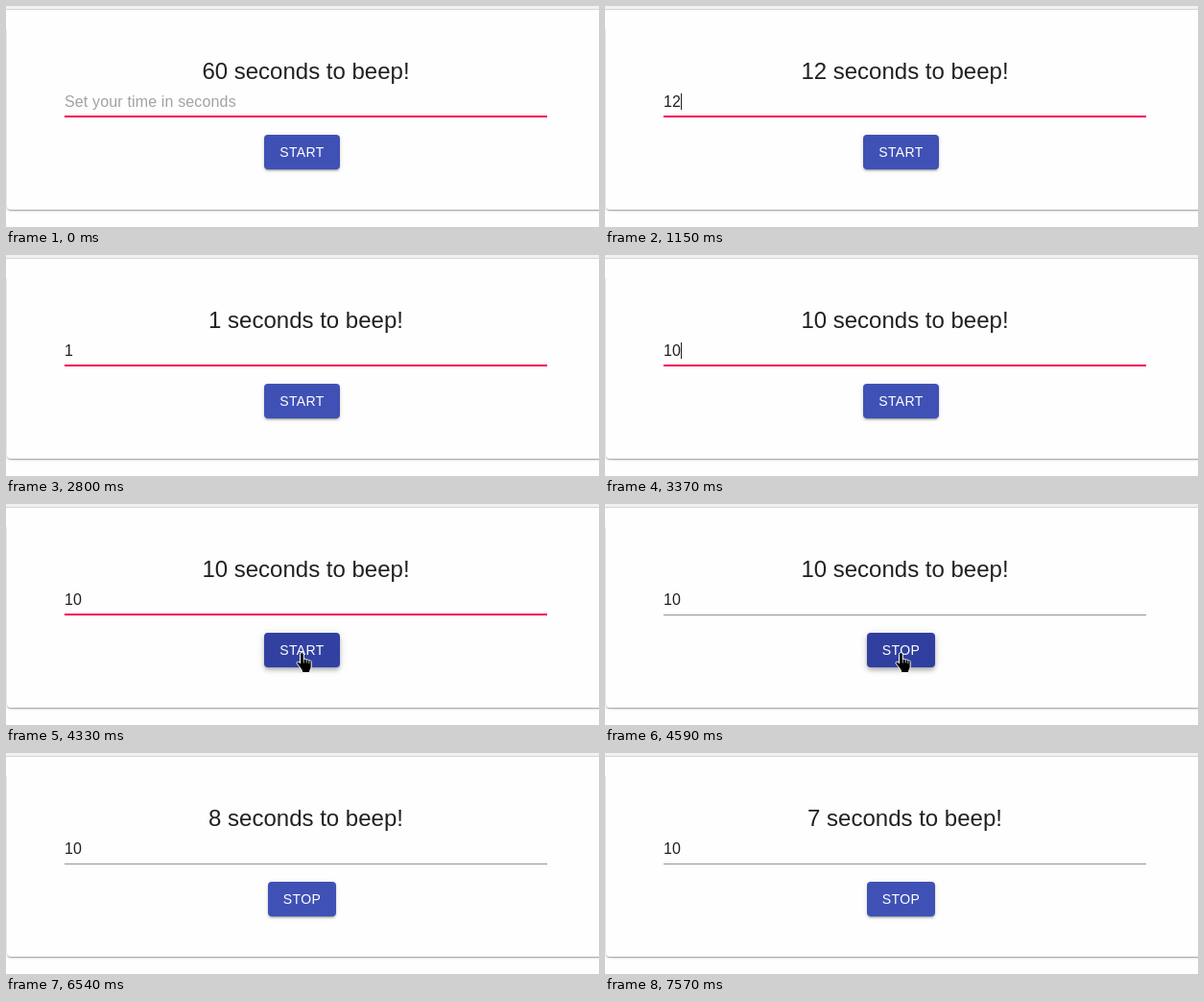
An HTML page that plays this animation: 618 by 230 pixels, repeating every 8000 ms.

```html
<!DOCTYPE html>
<html lang="en">
<head>
<meta charset="utf-8">
<title>Countdown timer</title>
<style>
  html, body { margin: 0; width: 100%; height: 100%; overflow: hidden; background: #fefefe; }
  body { position: relative; font-family: "Liberation Sans", Arial, sans-serif; color: #212121; }
  body * { position: absolute; box-sizing: border-box; white-space: pre; }
  #bar { left: 0; top: 0; width: 100%; height: 4px; background: #f1f1f1; border-bottom: 1px solid #d6d6d6; }
  #card {
    left: 1px; top: 18px; width: 640px; height: 194px; border-radius: 4px; background: #fefefe;
    box-shadow: 0 1px 3px rgba(0,0,0,.2), 0 1px 1px rgba(0,0,0,.14), 0 2px 1px -1px rgba(0,0,0,.12);
    clip-path: inset(6px 0 -6px -1px);
  }
  #title { left: 61px; top: 54px; width: 503px; font-size: 24px; line-height: 27px; text-align: center; }
  #field { left: 61px; top: 91px; font-size: 16px; line-height: 17px; letter-spacing: .15px; }
  #field.empty { color: rgba(0,0,0,.365); }
  #caret { top: 91px; width: 1px; height: 17px; background: #212121; }
  #rule { left: 61px; top: 115px; width: 503px; height: 1px; background: #949494; }
  #focus { left: 61px; top: 114px; width: 503px; height: 2px; background: #f50057; }
  #button {
    top: 134px; height: 36px; padding-top: 10px; border-radius: 4px; color: #fff;
    font-size: 14px; line-height: 16px; letter-spacing: .4px; text-align: center;
  }
  svg { left: 0; top: 0; overflow: visible; stroke: #fff; }
</style>
</head>
<body>
<div id="bar"></div>
<div id="card"></div>
<div id="title"></div>
<div id="field"></div>
<div id="caret"></div>
<div id="rule"></div>
<div id="focus"></div>
<div id="button"></div>
<svg id="arrow" width="13" height="20"><path d="M.5 .5V16.5L4.2 12.9 6.6 18.3 9 17.2 6.7 12H11.8Z"/></svg>
<svg id="hand" width="17" height="22">
  <path d="M4.5 2.5a1.9 1.9 0 0 1 3.8 0V7.5c1-.6 2.4-.3 2.9.6c1-.5 2.2-.2 2.6.7c1.2-.4 2.4.2 2.4 1.6V15c0 2-1 3-1.5 4.5V21.5H6.5V19.5C5.5 17.5 3 14.5 1.3 12.3C.3 10.8 2 9.5 3.3 10.5L4.5 11.7Z"/>
  <path d="M8.3 7.5v4M11.2 8v3.5M13.8 9v3" stroke-width=".7"/>
</svg>
<script>
const LOOP = 8000;
const $ = id => document.getElementById(id);

// Each step changes part of the state; hover runs from 0 to 1, focus is the pink line's scale.
const steps = [
  [0, { left: 60, value: '', caret: 0, focus: 1, label: 'START', hover: 0, pointer: null }],
  [590, { caret: 1 }],
  [1010, { caret: 0 }],
  [1150, { left: 12, value: '12', caret: 1 }],
  [1710, { caret: 0 }],
  [2260, { caret: 1 }],
  [2680, { left: 1, value: '1' }],
  [2800, { caret: 0 }],
  [3370, { left: 10, value: '10', caret: 1 }],
  [3910, { caret: 0, pointer: ['arrow', 425, 216] }],
  [4050, { pointer: ['arrow', 425, 182] }],
  [4200, { hover: .3, pointer: ['hand', 318, 157] }],
  [4330, { hover: .9, pointer: ['hand', 302, 154] }],
  [4450, { hover: 1, focus: .424 }],
  [4590, { focus: 0, label: 'STOP' }],
  [4720, { hover: .12, pointer: ['arrow', 506, 225] }],
  [4870, { hover: .05 }],
  [4990, { hover: 0 }],
  [5140, { pointer: null }],
  [5560, { left: 9 }],
  [6540, { left: 8 }],
  [7570, { left: 7 }]
];

const mix = (a, b, k) => a + (b - a) * k;

function shadow(h) {
  return `0 ${mix(3, 2, h)}px ${mix(1, 4, h)}px ${mix(-2, -1, h)}px rgba(0,0,0,.2),` +
    `0 ${mix(2, 4, h)}px ${mix(2, 5, h)}px rgba(0,0,0,.14),` +
    `0 1px ${mix(5, 10, h)}px rgba(0,0,0,.12)`;
}

function render(t) {
  const s = Object.assign({}, ...steps.filter(([at]) => at <= t).map(([, change]) => change));

  $('title').textContent = `${s.left} seconds to beep!`;
  $('field').textContent = s.value || 'Set your time in seconds';
  $('field').className = s.value ? '' : 'empty';
  $('caret').style.left = 61 + 9 * s.value.length + 'px';
  $('caret').style.opacity = s.caret;
  $('focus').style.transform = `scaleX(${s.focus})`;

  const width = s.label === 'START' ? 79 : 71;
  const rgb = [mix(63, 48, s.hover), mix(81, 63, s.hover), mix(181, 159, s.hover)].map(Math.round);
  $('button').textContent = s.label;
  Object.assign($('button').style, {
    left: 308.5 - width / 2 + 'px',
    width: width + 'px',
    background: `rgb(${rgb})`,
    boxShadow: shadow(s.hover)
  });

  const [shape, x, y] = s.pointer || [];
  for (const id of ['arrow', 'hand']) {
    $(id).style.display = id === shape ? 'block' : 'none';
    if (id === shape) $(id).style.transform = `translate(${x}px, ${y}px)`;
  }
}

const start = performance.now();
function tick() {
  render((performance.now() - start) % LOOP);
  requestAnimationFrame(tick);
}
tick();
</script>
</body>
</html>
```
